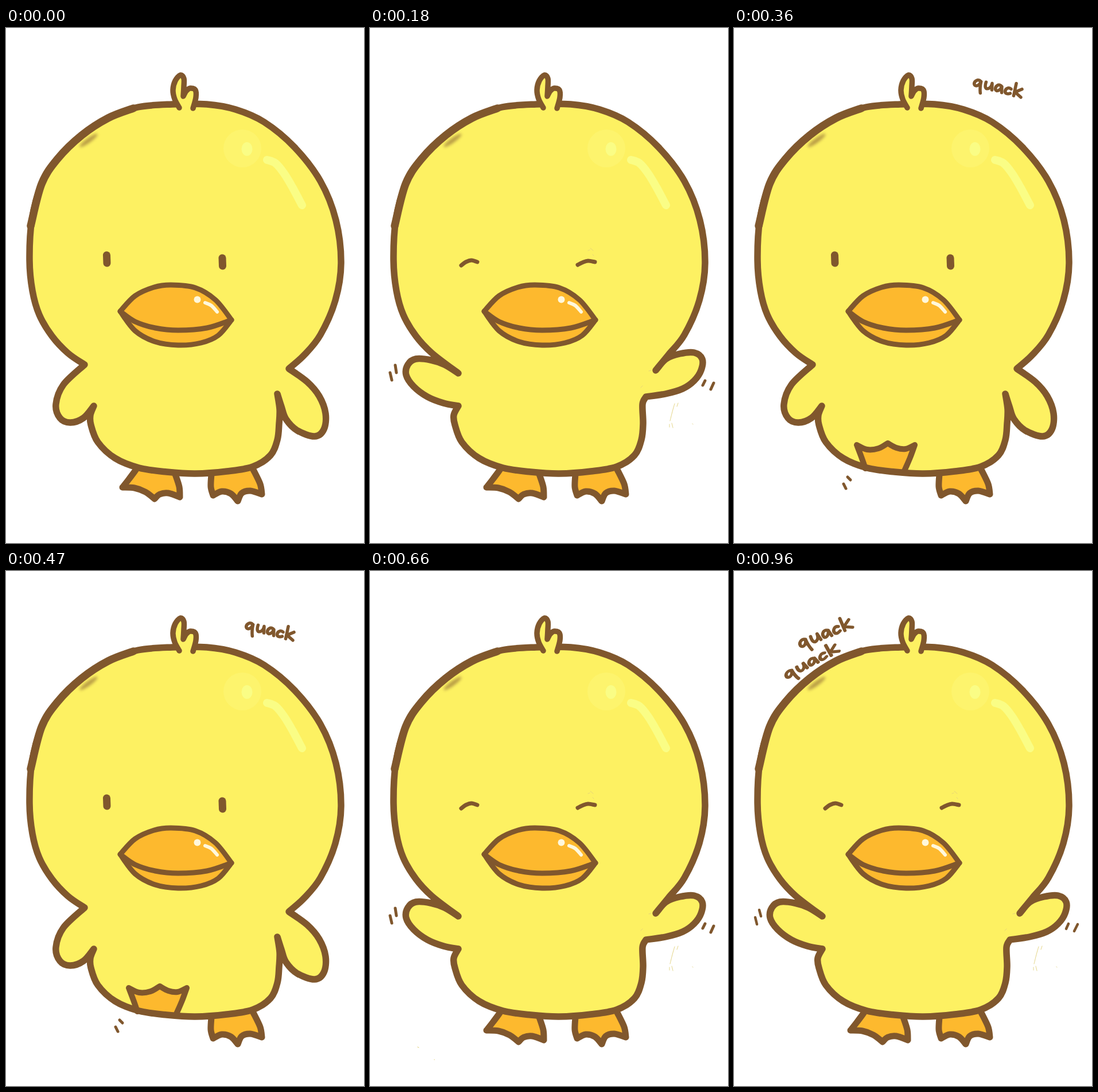
An HTML page that plays this animation: 624x898 px, repeating every 1080 ms.

```html
<!DOCTYPE html>
<html lang="en">
<head>
<meta charset="utf-8">
<title>Quacking duckling</title>
<style>
  html, body { margin: 0; width: 100%; height: 100%; overflow: hidden; background: #fff; }
  svg { display: block; width: 100vw; height: 100vh; }
</style>
</head>
<body>
<svg id="stage" viewBox="0 0 624 898" fill="none" stroke-linecap="round" stroke-linejoin="round">
  <defs>
    <filter id="soft" x="-50%" y="-100%" width="200%" height="300%"><feGaussianBlur stdDeviation="2.5"/></filter>
  </defs>
</svg>
<script>
const BROWN = '#80572d', YELLOW = '#fdf162', ORANGE = '#fdb92e', SHINE = '#fafd85', CREAM = '#fff8dc';
const LOOP = 1080;
const stage = document.getElementById('stage');

function add(parent, tag, attrs) {
  const el = document.createElementNS('http://www.w3.org/2000/svg', tag);
  for (const key in attrs) el.setAttribute(key, attrs[key]);
  return parent.appendChild(el);
}

// Smooth curve through "x,y x,y"; a "|" makes a corner at the point before it.
function smooth(text) {
  let last = null, d = '';
  for (const part of text.split('|')) {
    const pts = part.trim().split(/\s+/).map(p => p.split(',').map(Number));
    if (last) pts.unshift(last);
    else d = 'M' + pts[0];
    for (let i = 0; i < pts.length - 1; i++) {
      const b = pts[i], c = pts[i + 1], a = pts[i - 1] || b, e = pts[i + 2] || c;
      const c1 = b.map((v, k) => (v + (c[k] - a[k]) / 6).toFixed(2));
      const c2 = c.map((v, k) => (v - (e[k] - b[k]) / 6).toFixed(2));
      d += `C${c1} ${c2} ${c}`;
    }
    last = pts[pts.length - 1];
  }
  return d;
}

const line = (parent, pts, width, stroke = BROWN, fill = 'none') =>
  add(parent, 'path', { d: smooth(pts), 'stroke-width': width, stroke, fill });

const parts = {};
const group = (name, parent = stage) => (parts[name] = add(parent, 'g', {}));

// Body shapes
const head = '108,567 80,537 58,500 46,458 41,405 45,335 62,272 90,228 132,187 178,157 230,138 ' +
  '290,133 350,133 400,142 450,164 503,208 548,267 575,335 584,410 574,475 548,535 520,570';
const belly = '476,690 473,718 461,745 430,765 385,773 330,777 280,774 232,767 190,750 160,722 148,692';
const poses = {
  rest: `137,587 ${head} 493,594 | 525,617 546,642 557,672 554,700 538,712 508,702 488,682 480,660 473,638 | ` +
    `477,665 ${belly} 147,675 153,659 | 135,680 112,688 94,680 87,656 100,622 137,587`,
  flap: `154,602 ${head} 498,597 | 516,577 540,568 565,566 579,577 577,597 565,615 545,629 515,638 481,643 | ` +
    `475,656 ${belly} 146,675 154,659 | 128,654 100,643 76,625 63,605 66,587 80,577 106,579 130,587 154,602`
};

const duck = group('duck');

// Feet on the ground sit behind the body
line(group('leftDown', duck),
  '226,771 214,787 203,801 | 224,802 243,809 259,821 | 268,813 283,811 303,818 | 302,800 295,778', 11, BROWN, ORANGE);
line(group('rightDown', duck),
  '358,778 357,800 361,815 | 376,808 392,812 404,825 | 411,811 426,807 446,813 | 443,795 431,770', 11, BROWN, ORANGE);

for (const name in poses)
  add(group(name + 'Fill', duck), 'path', { d: smooth(poses[name]) + 'Z', fill: YELLOW });

// Lifted feet lie on the belly, under the outline
line(group('leftUp', duck),
  '229,768 222,748 214,727 | 232,735 252,733 268,724 | 283,732 299,734 315,727 | 307,749 297,772', 10, BROWN, ORANGE);
line(group('rightUp', duck),
  '353,772 350,750 347,731 | 359,738 373,736 381,718 | 390,732 404,732 415,713 | 421,735 426,764', 9, BROWN, ORANGE);

for (const name in poses)
  add(group(name + 'Line', duck), 'path', { d: smooth(poses[name]) + 'Z', stroke: BROWN, 'stroke-width': 11.5 });

line(duck, '43,345 62,272 90,228 132,187 178,157 222,140', 13.5);
add(duck, 'ellipse', { cx: 144, cy: 196, rx: 19, ry: 4, fill: BROWN, opacity: .55,
  filter: 'url(#soft)', transform: 'rotate(-36 144 196)' });

// Tuft
line(duck, '302,139 294,124 291,108 295,92 304,82 310,88 310,102 309,119 | 314,110 321,105 330,108 331,121 326,140',
  9.5, BROWN, YELLOW);

// Head shine
add(duck, 'circle', { cx: 412, cy: 210, r: 33, fill: '#fdf46d' });
add(duck, 'ellipse', { cx: 420, cy: 211, rx: 9.5, ry: 12, fill: SHINE });
line(duck, '455,230 470,236 485,254 500,279 516,309', 14, SHINE);

// Beak
line(duck, '199,494 225,467 258,452 288,448 330,453 365,474 393,509 | 370,536 340,549 300,553 260,547 225,528 199,494',
  9, BROWN, ORANGE);
line(duck, '199,494 225,512 260,523 300,527 350,523 393,509', 9);
add(duck, 'circle', { cx: 333.5, cy: 473.5, r: 6, fill: CREAM });
line(duck, '347,479 358,484 368,495', 6, CREAM);

// Eyes
const open = group('open', duck);
line(open, '175.5,396 176,410', 13);
line(open, '377,401 377.5,415', 13);
const shut = group('shut', duck);
line(shut, '159,414 167,408 177,405 187,408', 7);
line(shut, '362,413 370,409 380,406 392,408', 7);

// Motion marks and stray pencil flecks
function marks(name, width, ...lines) {
  const g = group(name);
  lines.forEach(pts => line(g, pts, width));
}
marks('wave', 5, '35,601 38,614', '44,588 46,601', '584,615 580,623', '599,619 594,630');
marks('waveSoft', 4.5, '37,604 40,616', '44,591 47,602', '583,615 579,624', '599,616 593,628');
marks('leftKick', 5, '191,795 195,803', '198,783 203,788');
marks('rightKick', 4.5, '468,767 461,776', '481,769 474,780');

const flecks = group('flecks');
for (const pts of ['531,655 527,669 523,685', '537,654 535,660', '526,689 528,697', '522,691 522,696', '562,690 563,691'])
  line(flecks, pts, .8, '#dcc968');
for (const pts of ['384,384 389,388', '380,388 383,387', '388,395 390,397', '486,598 490,597', '472,627 475,624'])
  line(flecks, pts, 1, '#e5d27a');
const dust = group('dust');
line(dust, '83,830 85,831', 1, '#dcc968');
line(dust, '112,852 112.5,852', 1, '#dcc968');

// Hand lettering, laid from the middle of the q to the middle of the k
const lettering = 'M12 2C6-2 0 3 1 9C3 14 10 12 12 2Q12 14 15 23' +
  'M21 1C20 11 23 14 27 12C31 10 32 5 32 1L34 13' +
  'M50 3C43-2 38 5 40 11C42 15 49 11 50 3L52 14' +
  'M67 4C61 0 56 7 58 12C60 15 64 14 67 12' +
  'M74-8L74 15M86 0L75 8L87 15';

function quack(name, x1, y1, x2, y2, height, width = 5.5) {
  const dx = x2 - x1, dy = y2 - y1;
  const turn = Math.atan2(dy, dx) * 180 / Math.PI, stretch = Math.hypot(dx, dy) / 73;
  const g = group(name);
  g.setAttribute('role', 'img');
  g.setAttribute('aria-label', 'quack');
  const pen = add(g, 'g', { transform: `translate(${x1} ${y1}) rotate(${turn}) scale(${stretch} ${height}) translate(-7 -6)` });
  add(pen, 'path', { d: lettering, stroke: BROWN, 'stroke-width': width / Math.sqrt(stretch * height) });
}
quack('rightWord', 425, 96, 495, 111, .95);
quack('rightWordSmall', 427, 98, 494, 111, .95);
quack('rightWordLow', 469, 142, 542, 159, 1);
quack('leftWord', 121, 125, 196, 93, 1);
quack('leftWordLow', 97, 179, 172, 137, .88);

// Each scene: end time, visible parts, sideways nudge of the duck
const rest = 'restFill restLine open ', flap = 'flapFill flapLine shut flecks ';
const stand = 'leftDown rightDown ';
const scenes = [
  [180, rest + stand],
  [360, flap + stand + 'wave'],
  [540, rest + 'leftUp rightDown leftKick rightWord'],
  [660, rest + stand + 'rightWordSmall rightWordLow'],
  [780, flap + stand + 'wave dust'],
  [960, rest + 'leftDown rightUp rightKick leftWord', 1],
  [LOOP, flap + stand + 'waveSoft leftWord leftWordLow']
].map(([end, names, nudge = 0]) => ({ end, nudge, shown: new Set(['duck', ...names.trim().split(' ')]) }));

let current = null;
function render(time) {
  const t = time % LOOP;
  const scene = scenes.find(s => t < s.end);
  if (scene === current) return;
  current = scene;
  for (const name in parts) parts[name].style.display = scene.shown.has(name) ? '' : 'none';
  duck.setAttribute('transform', `translate(${scene.nudge} 0)`);
}

function tick() {
  render(performance.now());
  requestAnimationFrame(tick);
}
tick();
</script>
</body>
</html>
```
